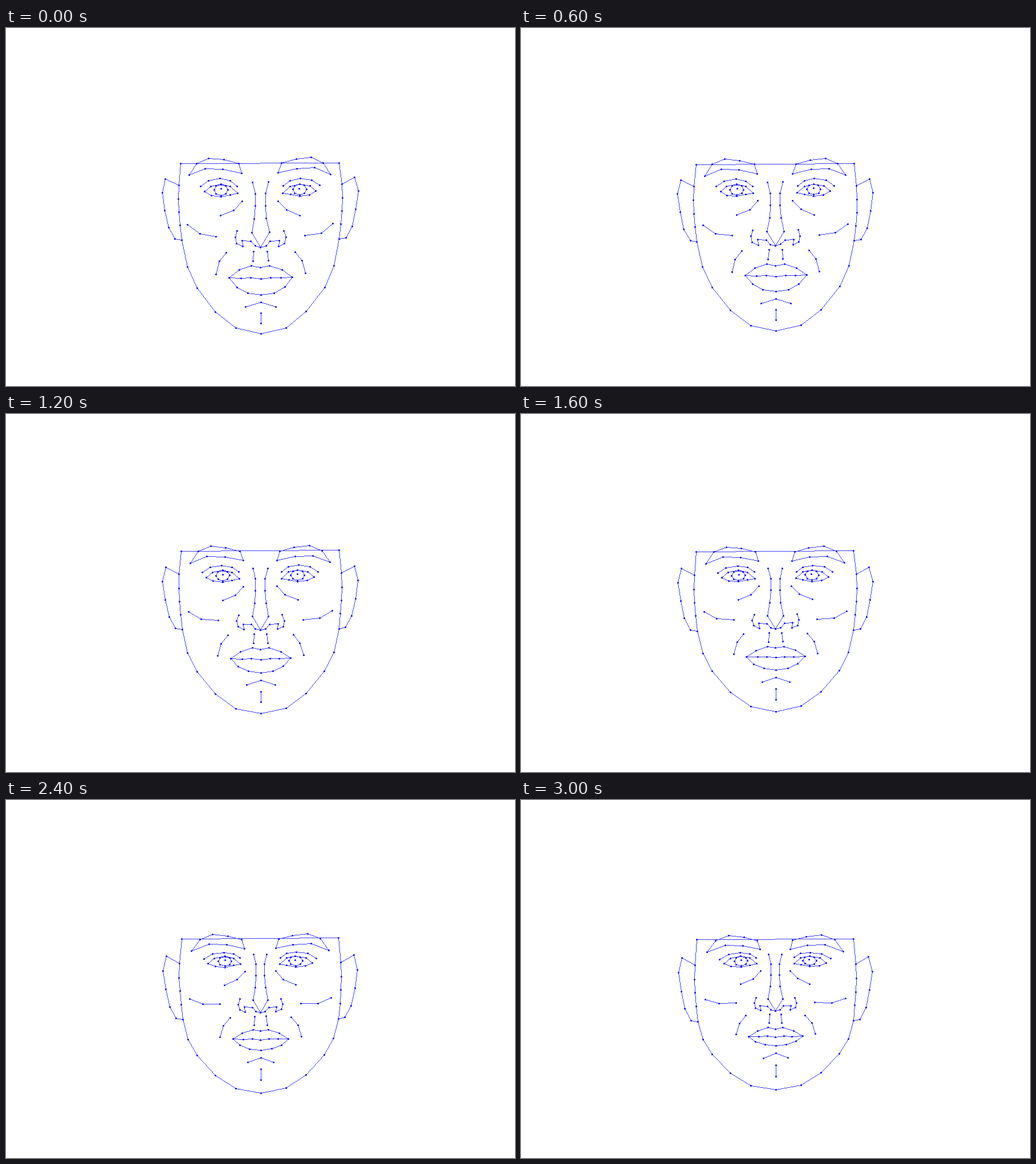
These frames come from a looping animation (893 px wide and 627 px high, 3.1 s). An HTML page with a canvas:

```html
<!DOCTYPE html>
<html lang="en">
<head>
<meta charset="utf-8">
<title>Face mesh morph</title>
<style>
html, body { margin: 0; width: 100%; height: 100%; overflow: hidden; background: #fff; }
canvas { display: block; }
</style>
</head>
<body>
<canvas id="stage" width="893" height="627"></canvas>
<script>
const ctx = document.getElementById('stage').getContext('2d');
const STEP = 100, LOOP = 3100, LAST = 29;
const LINE = '#4040ff', DOT = '#00f';
const TILT = 0.0065, CX = 446.3, CY = 390;

// The face is one half, mirrored and slightly tilted.
// Points are "distance from the axis, height".
const strokes = [];
const points = text => text.split(' ').map(pair => pair.split(',').map(Number));
const add = (pts, opts = {}) => strokes.push({ pts, ...opts });
const line = text => add(points(text));
const ring = text => add(points(text), { closed: true });
const rim = text => add(points(text), { rim: true });

// Jaw and ear
rim('139,236.5 143,274 144,298 143,321 141,344 138,370 128.5,417 112,454.5 79.5,496.5 44,525 0,535');
rim('143,274 166,262.5 172,286.5 167.5,318 161,348 150,368 138,370');

// Brow, lid, eye, iris, pupil
ring('124,256.5 111,236.3 90,227 63.5,229.5 37.5,236.3 32,253.5 65,246.5 96,245');
line('104.5,276 90.5,266.5 70.5,263 52.5,267 40.5,276.5');
ring('97.5,285.5 87,276.7 69,273 52.5,277 39.5,289 53,291.5 69,294.5 86,292.5');
const iris = Array.from({ length: 8 }, (_, i) => {
  const a = i * Math.PI / 4;
  return [69 + 12 * Math.cos(a), 282.7 + 9.5 * Math.sin(a)];
});
add(iris, { closed: true });
line('68.5,281');

// Under-eye and cheek
line('69.5,328 46.5,318.5 31.5,303');
line('127.5,343 106.5,359.5 78,364');

// Nose, philtrum, fold
line('14,269.5 9,289.5 9,311 10.5,333.5 15.5,357.5 0,384');
line('41,355 44.5,366 42,377 31.5,382 32.5,372 17,373 9.5,381 0,384');
line('12,391 13.5,407.5');
line('60.5,392.5 72.5,407.5 78.5,430');

// Lips and chin
line('55.5,436.5 37.5,423 16,416 0,419');
line('55.5,436.5 35,437.5 17.5,437 0,439');
line('55.5,436.5 42,453.5 23,464 0,467');
line('26.5,488 0,480');
line('0,499 0,517');

// Total vertical shift at a given height, inside the face and on its rim
const inner = points('228,10 257,7 270,0 290,-3 320,-6 357,-9 384,-15 425,-19 438,-24 466,-37 490,-36.5 517,-33.5');
const outer = points('237,7 270,14 370,17 418,1 455,-10 535,-28');

function lerpKeys(keys, y) {
  let i = 1;
  while (i < keys.length - 1 && y > keys[i][0]) i++;
  const [y0, v0] = keys[i - 1], [y1, v1] = keys[i];
  const k = Math.min(1, Math.max(0, (y - y0) / (y1 - y0)));
  return v0 + (v1 - v0) * k;
}

// The inside narrows and is squeezed; the rim mostly slides
function warp([u, y], p, rim) {
  const w = Math.min(1, (u / 145) ** 5);
  const pull = rim ? 2.2 * w : 9 * Math.sin(Math.PI * u / 150);
  const a = lerpKeys(inner, y), b = lerpKeys(outer, y);
  return [u - pull * p, y + (a + (b - a) * (rim ? 1 : w)) * p];
}

function place([u, y], side) {
  return [
    Math.round(CX + side * u + TILT * (y - CY)),
    Math.round(y - TILT * side * u)
  ];
}

// Hard-edged one-pixel segment
function segment([x0, y0], [x1, y1]) {
  const n = Math.max(Math.abs(x1 - x0), Math.abs(y1 - y0));
  for (let i = 0; i <= n; i++) {
    const k = n ? i / n : 0;
    ctx.fillRect(Math.round(x0 + (x1 - x0) * k), Math.round(y0 + (y1 - y0) * k), 1, 1);
  }
}

function dot([x, y]) {
  ctx.beginPath();
  ctx.arc(x + 0.5, y + 0.5, 1.5, 0, 2 * Math.PI);
  ctx.fill();
}

function draw(p) {
  ctx.fillStyle = '#fff';
  ctx.fillRect(0, 0, 893, 627);

  const shapes = strokes.flatMap(({ pts, closed, rim }) => {
    const moved = pts.map(pt => warp(pt, p, rim));
    return [-1, 1].map(side => ({ closed, pts: moved.map(pt => place(pt, side)) }));
  });

  ctx.fillStyle = LINE;
  segment(shapes[0].pts[0], shapes[1].pts[0]);
  for (const { pts, closed } of shapes) {
    pts.slice(1).forEach((pt, i) => segment(pts[i], pt));
    if (closed) segment(pts[pts.length - 1], pts[0]);
  }

  ctx.fillStyle = DOT;
  const spots = new Map(shapes.flatMap(s => s.pts).map(pt => [pt.join(), pt]));
  spots.forEach(dot);
}

const start = performance.now();
let shown = -1;

function tick(now) {
  const t = Math.max(0, now - start) % LOOP;
  const step = Math.max(0, Math.floor(t / STEP) - 1);
  if (step !== shown) draw((shown = step) / LAST);
  requestAnimationFrame(tick);
}
tick(start);
</script>
</body>
</html>
```
